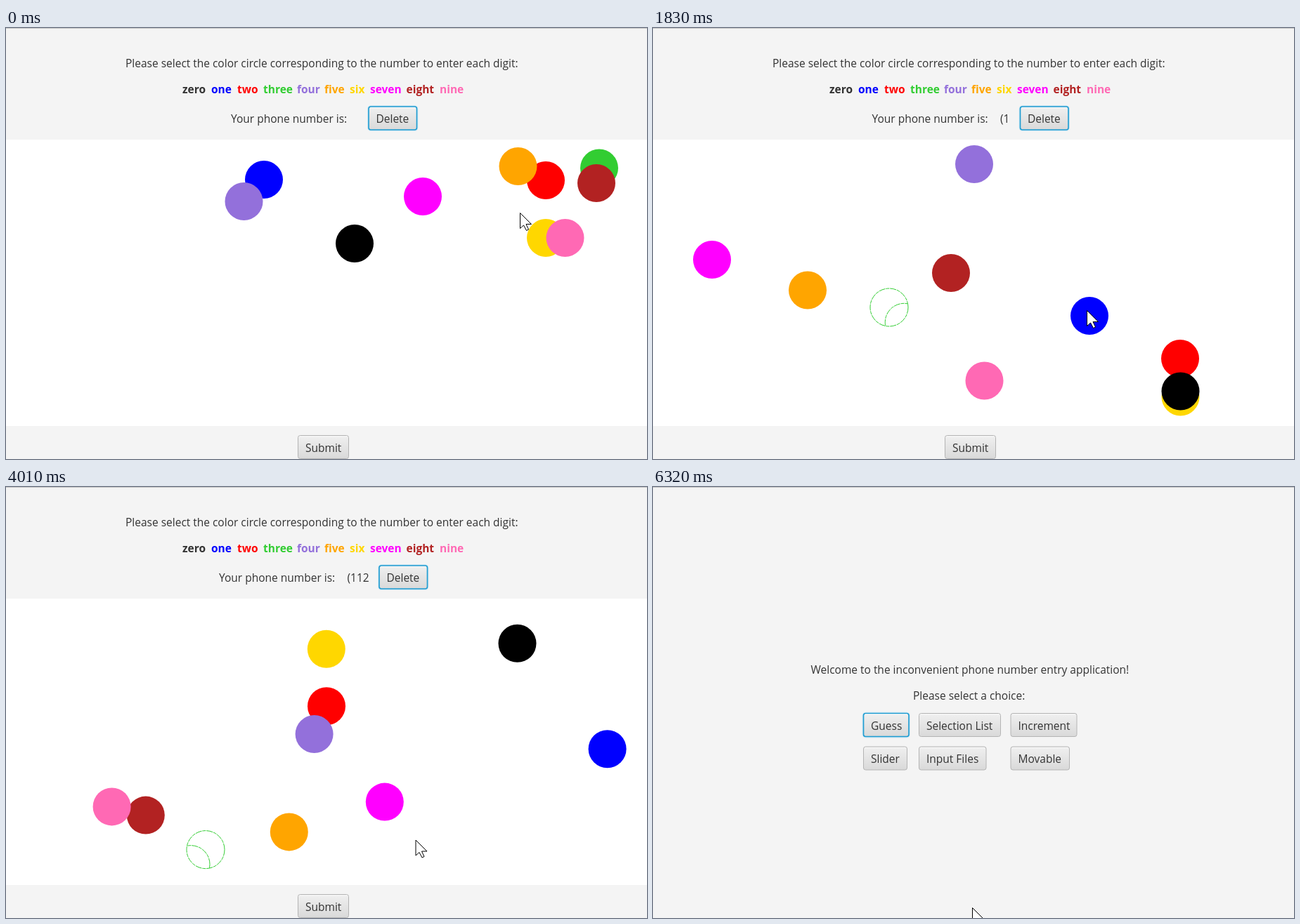
An HTML page for the animation above (6.55 s loop, 912x614 px).

```html
<!DOCTYPE html>
<html lang="en">
<head>
<meta charset="utf-8">
<title>Color circle phone entry</title>
<style>
  html, body { margin: 0; width: 100%; height: 100%; overflow: hidden; background: #f4f4f4; }
  svg { display: block; width: 912px; height: 614px; }
  text { font: 15.5px "Open Sans", "Noto Sans", sans-serif; fill: #333; white-space: pre; }
  .bold { font-weight: 700; }
  .button rect { fill: url(#face); stroke: #b4b4b4; }
  .button.focused rect { stroke: #1c9bd1; stroke-width: 1.6; }
  .button .glow { display: none; }
  .button.focused .glow { display: block; fill: none; stroke: #cfe8f3; stroke-width: 4; }
</style>
</head>
<body>
<svg id="stage" viewBox="0 0 912 614">
  <defs>
    <linearGradient id="face" x2="0" y2="1">
      <stop offset="0" stop-color="#f0f0f0"/>
      <stop offset="1" stop-color="#d9d9d9"/>
    </linearGradient>
    <clipPath id="ringClip"><circle id="ringClipDisc" r="27"/></clipPath>
  </defs>
  <rect width="912" height="614" fill="#f4f4f4"/>
  <g id="entry"></g>
  <g id="welcome"></g>
  <circle id="press" r="16.5" fill="#ff0" fill-opacity=".5"/>
  <path id="cursor" d="M0 0V22L5 17.5 9 25 12 23.5 8.5 16H16Z" fill="#fff" stroke="#000"/>
  <rect width="912" height="1" fill="#c6c6c6"/>
</svg>
<script>
const LOOP = 6550, CUT = 59, WELCOME = 82, RADIUS = 27;
const WALLS = { x: [16, 886], y: [186, 540] };
const $ = id => document.getElementById(id);
const set = (node, attrs) => {
  for (const name in attrs) node.setAttribute(name, attrs[name]);
};

// Coordinates are unfolded: values past a wall are reflected back when drawn.
// x, y before the cut; x2, y2 after it.
const PRE = [0, 8, 24, 44], POST = [CUT, 67];
const discs = [
  { color: '#00f', x: [367, 451, 621, 832], y: [216, 132, -38, -250], x2: [416, 329], y2: [384, 471] },
  { color: '#f00', x: [768, 852, 1022, 1232], y: [217, 301, 471, 683], x2: [17.5, 105], y2: [445.5, 532] },
  { color: '#32cd32', x: [844, 676, 336, -84], y: [199.5, 31, -310, -731], x2: [632, 458], y2: [449.5, 276] },
  { color: '#9370db', x: [338.5, 85.5, -425, -1051], y: [247, -5.5, -514, -1144], x2: [885, 632], y2: [320.5, 60] },
  { color: '#ffa500', x: [728.5, 560, 220, -202], y: [197, 365, 706.5, 1128], x2: [489.5, 315.5], y2: [425, 251] },
  { color: '#ffd700', x: [768, 852, 1021.5, 1232], y: [299, 383, 554.5, 765], x2: [17.5, 105], y2: [524, 613] },
  { color: '#f0f', x: [593, 424, 84, -338], y: [240, 409, 750, 1171], x2: [353.5, 179.5], y2: [381.5, 208] },
  { color: '#b22222', x: [840, 1008, 1348, 1770], y: [221, 390, 731, 1152], x2: [693, 519], y2: [401, 227] },
  { color: '#ff69b4', x: [795.5, 960.5, 1300.5, 1722], y: [299, 133, -205.5, -624], x2: [768, 594], y2: [462, 634.5] },
  { color: '#000', x: [496, 580.5, 750.5, 960.5], y: [307, 391, 562.5, 773], x2: [287, 200], y2: [535, 624] }
];
const green = discs[2];

// [step, typed number, label x, button x]
const typed = [
  [0, '', 320, 516],
  [23, '(1', 311.5, 522.5],
  [39, '(11', 307.5, 526.5],
  [45, '(112', 303, 531],
  [CUT, '(112)-555-0143', 264, 571.5]
];
const pointer = {
  at: [0, 8, 16, 20, 24, 28, 33, 38, 44, 50, 58, 59, 63, 67, 74, 82],
  x: [731, 769, 650, 590, 617, 640, 695, 770, 550, 590, 560, 480, 440, 419, 440, 454],
  y: [263, 267, 330, 372, 402, 470, 575, 522, 408, 470, 600, 625, 600, 582, 592, 599]
};
const presses = [22, 38, 44];

function along(keys, values, n) {
  let i = 0;
  while (i < keys.length - 2 && n >= keys[i + 1]) i++;
  return values[i] + (values[i + 1] - values[i]) * (n - keys[i]) / (keys[i + 1] - keys[i]);
}

function fold(v, [low, high]) {
  const span = high - low, cycle = 2 * span;
  const d = ((v - low) % cycle + cycle) % cycle;
  return low + (d > span ? cycle - d : d);
}

function place(disc, n) {
  const late = n >= CUT, keys = late ? POST : PRE;
  return {
    cx: fold(along(keys, late ? disc.x2 : disc.x, n), WALLS.x),
    cy: fold(along(keys, late ? disc.y2 : disc.y, n), WALLS.y)
  };
}

const label = (x, y, words, extra = '') => `<text x="${x}" y="${y}" ${extra}>${words}</text>`;
const button = (x, y, w, words, id = '', focused = false) =>
  `<g id="${id}" class="button${focused ? ' focused' : ''}" transform="translate(${x} ${y})">
    <rect class="glow" x="-.5" y="-.5" width="${w + 1}" height="34" rx="4" style="fill:none;stroke:#cfe8f3;stroke-width:3"/>
    <rect width="${w}" height="33" rx="3"/>
    <path d="M2 1.5H${w - 2}" stroke="#fafafa"/>
    ${label(10.5, 23, words)}</g>`;

const legend = [
  ['zero', 251, '#333'], ['one', 292, '#00f'], ['two', 329, '#f00'], ['three', 366, '#32cd32'],
  ['four', 414, '#9370db'], ['five', 453, '#ffa500'], ['six', 489, '#ffd700'],
  ['seven', 518, '#f0f'], ['eight', 569.5, '#b22222'], ['nine', 617, '#ff69b4']
];

$('entry').innerHTML =
  '<rect y="159" width="912" height="408" fill="#fff"/>' +
  label(170, 56, 'Please select the color circle corresponding to the number to enter each digit:') +
  legend.map(([word, x, color]) => label(x, 93, word, `class="bold" style="fill:${color}"`)).join('') +
  label(320, 135, 'Your phone number is:', 'id="prompt"') +
  label(494, 135, '', 'id="number"') +
  button(516, 112, 68.5, 'Delete', 'delete', true) +
  button(415.5, 580.5, 72, 'Submit') +
  discs.map((d, i) => `<circle id="disc${i}" r="${RADIUS}" fill="${d.color}"/>` + (d === green ?
    `<g clip-path="url(#ringClip)"><circle id="trail" r="${RADIUS}" fill="none"
      stroke="${d.color}" stroke-dasharray="9 1 5 1"/></g>` : '')).join('');

$('welcome').innerHTML =
  label(224.5, 266, 'Welcome to the inconvenient phone number entry application!') +
  label(370, 303, 'Please select a choice:') +
  button(299.5, 322.5, 64.5, 'Guess', '', true) +
  button(378.5, 322.5, 116, 'Selection List') +
  button(509, 322.5, 94, 'Increment') +
  button(299.5, 370, 62, 'Slider') +
  button(378.5, 370, 95.5, 'Input Files') +
  button(509, 370, 83.5, 'Movable');

// Start time of every ninth step.
const marks = [0, 680, 1380, 2060, 2780, 3470, 4160, 4860, 5560, 6240];

function stepAt(t) {
  if (t >= 6320) return WELCOME;
  let k = marks.length - 1;
  while (t < marks[k]) k--;
  if (k === marks.length - 1) return 81;
  return 9 * k + Math.floor(9 * (t - marks[k] + 10) / (marks[k + 1] - marks[k]));
}

function drawGreen(n) {
  const ring = n > 0, now = place(green, n);
  set($('disc2'), {
    fill: ring ? '#fff' : green.color,
    stroke: ring ? green.color : 'none',
    'stroke-dasharray': '9 1 5 1'
  });
  set($('ringClipDisc'), now);
  set($('trail'), { ...place(green, n - 1), visibility: ring && n !== CUT ? 'visible' : 'hidden' });
}

function draw(n) {
  const done = n >= WELCOME;
  $('entry').style.display = done ? 'none' : '';
  $('welcome').style.display = done ? '' : 'none';

  discs.forEach((disc, i) => set($('disc' + i), place(disc, n)));
  drawGreen(n);

  const [, digits, labelX, buttonX] = typed.filter(row => row[0] <= n).pop();
  set($('prompt'), { x: labelX });
  set($('number'), { x: labelX + 182.5 });
  $('number').textContent = digits;
  set($('delete'), {
    transform: `translate(${buttonX} 112)`,
    class: n < CUT ? 'button focused' : 'button'
  });

  const x = along(pointer.at, pointer.x, n), y = along(pointer.at, pointer.y, n);
  set($('cursor'), { transform: `translate(${x + .5} ${y + .5})` });
  set($('press'), { cx: x, cy: y - 1.5, visibility: presses.includes(n) ? 'visible' : 'hidden' });
}

let shown = -1;
function tick() {
  const n = stepAt(performance.now() % LOOP);
  if (n !== shown) draw(shown = n);
  requestAnimationFrame(tick);
}
tick();
</script>
</body>
</html>
```
